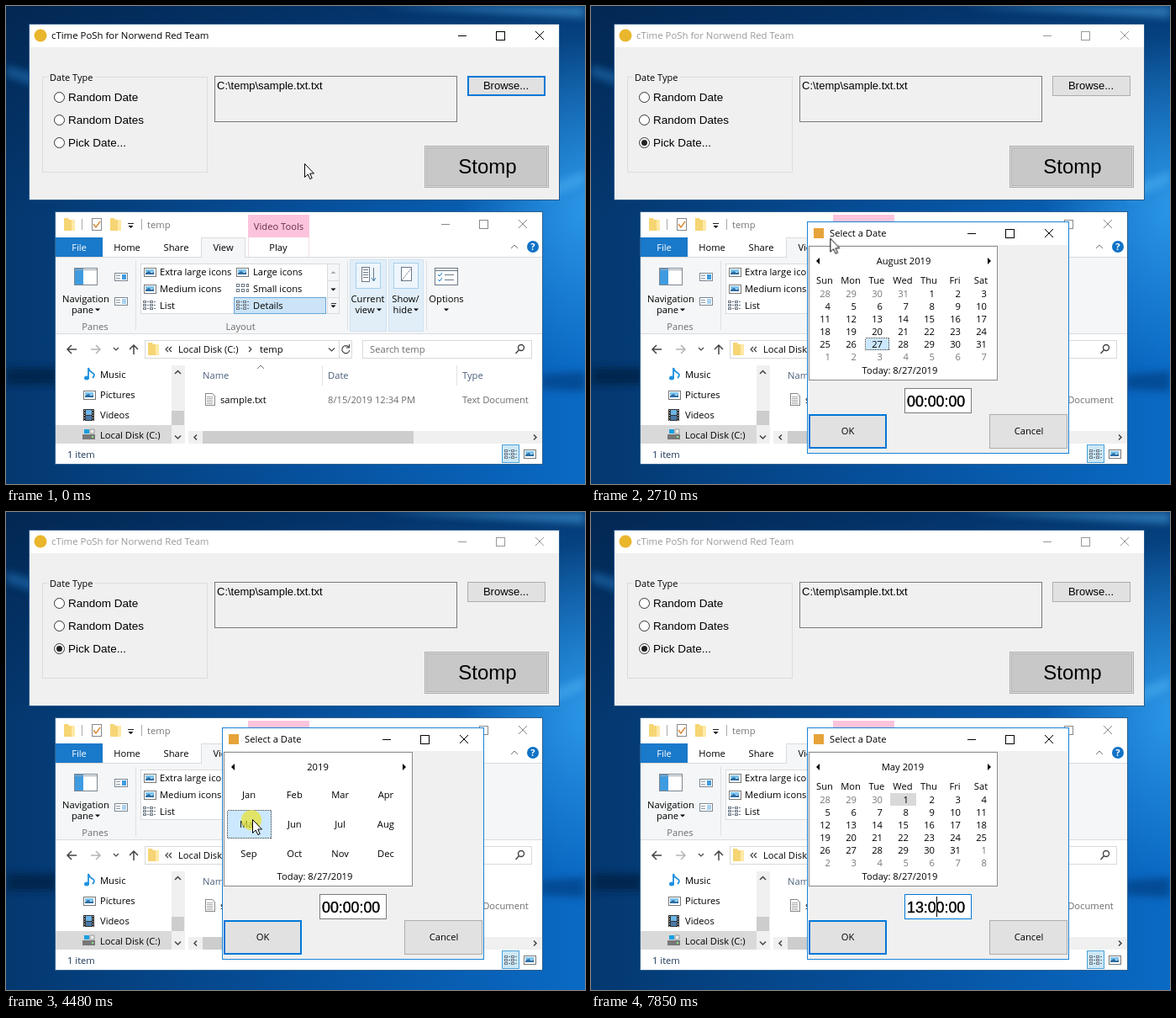
Animation, 689 px wide and 568 px high, one loop 8 s. Source, as an HTML page:

```html
<!DOCTYPE html>
<html lang="en">
<head>
<meta charset="utf-8">
<title>Date picker demo</title>
<style>
html,body{margin:0;width:100%;height:100%;overflow:hidden;background:#06407f}
svg{display:block;width:689px;height:568px}
text{font:11.2px "Open Sans","Noto Sans",sans-serif;fill:#000;white-space:pre}
.form text{font:13px "Liberation Sans",Arial,sans-serif}
.form .radio text{font-size:13.5px}
.form .ui,.form text.ui{font:11.4px "Open Sans","Noto Sans",sans-serif}
.form .ui{fill:currentColor}
.form .big{font-size:24px}
.time text{font:17.8px "Liberation Sans",Arial,sans-serif;stroke:#000;stroke-width:.4}
.m,.grid text,.m text{text-anchor:middle}
.grid .num{text-anchor:end}
.grid .out{fill:#777}
.gray{fill:#6d6d6d}
.head{fill:#4c607a}
rect,.crisp{shape-rendering:crispEdges}
.line{fill:none;stroke:currentColor}
.sel{fill:#cce8ff;stroke:#333;stroke-dasharray:1 1}
.hot{fill:#e5f3ff}
.blue,.grid .blue{fill:#0078d7}

/* state switches share one 8 s clock */
.k{animation:8s step-end infinite}
@keyframes active{0%{color:#000}19.5%,to{color:#999}}
@keyframes before{0%{opacity:1}19.5%,to{opacity:0}}
@keyframes radioHot{0%{stroke:#333}15.4%{stroke:#0078d7}19.5%,to{stroke:#333}}
@keyframes picked{0%{opacity:0}18.5%,to{opacity:1}}
@keyframes dialog{0%,19.4%{opacity:0;transform:scale(.92)}21.25%,to{opacity:1;transform:none}}
@keyframes august{0%{opacity:1}41.75%,to{opacity:0}}
@keyframes augTitle{0%{fill:#000}37.75%,to{fill:#0078d7}}
@keyframes months{0%{opacity:0}41.75%{opacity:1}57.25%,to{opacity:0}}
@keyframes yearTitle{0%{fill:#0078d7}45.625%,to{fill:#000}}
@keyframes marHot{0%{opacity:0}45.625%{opacity:1}46.5%,to{opacity:0}}
@keyframes febHot{0%{opacity:0}46.5%{opacity:1}51.2%,to{opacity:0}}
@keyframes mayHot{0%{opacity:0}53.1%,to{opacity:1}}
@keyframes augSel{0%{opacity:1}55.1%,to{opacity:0}}
@keyframes maySel{0%{opacity:0}55.1%,to{opacity:1}}
@keyframes may{0%{opacity:0}57.25%,to{opacity:1}}
@keyframes hot12{0%{opacity:1}60%,to{opacity:0}}
@keyframes hot1{0%{opacity:0}64.1%{opacity:1}67%,to{opacity:0}}
@keyframes sel31{0%{opacity:1}67%,to{opacity:0}}
@keyframes sel1{0%{opacity:0}67%{opacity:1}76.875%,to{opacity:0}}
@keyframes kept1{0%{opacity:0}76.875%,to{opacity:1}}
@keyframes text1{0%{fill:#000}64.1%{fill:#0078d7}69%,to{fill:#000}}
@keyframes box{0%{stroke:#7a7a7a}75%{stroke:#222}76.875%,to{stroke:#0078d7}}
@keyframes zero{0%{opacity:1}88.5%,to{opacity:0}}
@keyframes marked{0%{opacity:0}76.875%{opacity:1}88.5%,to{opacity:0}}
@keyframes typed1{0%{opacity:0}88.5%{opacity:1}91.375%,to{opacity:0}}
@keyframes typed2{0%{opacity:0}91.375%,to{opacity:1}}
@keyframes caret{
  0%{opacity:0;transform:translate(386px)}88.5%{opacity:1;transform:translate(386px)}
  91.375%{opacity:1;transform:translate(396px)}95.25%{opacity:1;transform:translate(401px)}
  98.125%,to{opacity:1;transform:translate(411px)}}
@keyframes click{
  0%{opacity:0}18.5%{opacity:.75;transform:translate(104px,158px)}19.5%{opacity:0}
  39.75%{opacity:.75;transform:translate(366px,302px)}40.75%{opacity:0}
  56%{opacity:.75;transform:translate(292px,366px)}57.25%{opacity:0}
  75%{opacity:.75;transform:translate(394px,463px)}78.75%,to{opacity:0}}
@keyframes arrow{0%{opacity:1}75%{opacity:0}78.75%{opacity:1}88.5%,to{opacity:0}}
@keyframes beam{0%{opacity:0}75%{opacity:1}78.75%,to{opacity:0}}
@keyframes path{
  0%{transform:translate(355px,187px)}
  7.5%{transform:translate(355px,187px);animation-timing-function:steps(3,start)}
  10.46%{transform:translate(310px,186px);animation-timing-function:steps(5,start)}
  15.4%{transform:translate(150px,164px);animation-timing-function:steps(3,start)}
  18.36%{transform:translate(104px,157px)}
  25%{transform:translate(104px,157px);animation-timing-function:steps(3,start)}
  27.925%{transform:translate(130px,175px);animation-timing-function:steps(5,start)}
  32.8%{transform:translate(265px,265px);animation-timing-function:steps(3,start)}
  35.74%{transform:translate(294px,281px);animation-timing-function:steps(4,start)}
  39.75%{transform:translate(367px,301px)}
  45.625%{transform:translate(367px,301px);animation-timing-function:steps(1,start)}
  46.5%{transform:translate(376px,324px);animation-timing-function:steps(2,start)}
  48.25%{transform:translate(352px,333px)}
  50.25%{transform:translate(352px,333px);animation-timing-function:steps(6,start)}
  56%{transform:translate(293px,365px)}
  60%{transform:translate(293px,365px);animation-timing-function:steps(5,start)}
  65.15%{transform:translate(371px,342px)}
  69%{transform:translate(371px,342px);animation-timing-function:steps(4,start)}
  73%{transform:translate(322px,440px);animation-timing-function:steps(3,start)}
  76%{transform:translate(394px,463px)}
  78.75%{transform:translate(394px,463px);animation-timing-function:steps(3,start)}
  81.86%{transform:translate(338px,461px);animation-timing-function:steps(1,start)}
  82.9%,to{transform:translate(347px,461px)}}
#dialog{transform-origin:413px 394px;animation:dialog 8s ease-out infinite}
</style>
</head>
<body>
<svg viewBox="0 0 689 568">
<defs>
  <linearGradient id="sky"><stop offset="0" stop-color="#04386f"/><stop offset=".5" stop-color="#06509c"/><stop offset="1" stop-color="#0a6ac4"/></linearGradient>
  <linearGradient id="top" x2="0" y2="1"><stop offset="0" stop-color="#021c40" stop-opacity=".6"/><stop offset=".45" stop-color="#021c40" stop-opacity="0"/></linearGradient>
  <radialGradient id="glow"><stop offset="0" stop-color="#36a5f2" stop-opacity=".75"/><stop offset="1" stop-color="#36a5f2" stop-opacity="0"/></radialGradient>
  <filter id="soft"><feGaussianBlur stdDeviation="4"/></filter>
  <g id="folder"><path d="M0 0h5l1 2h7v13H0z" fill="#f6d574"/><path d="M9 2h4v13H9z" fill="#ffe9a6"/></g>
  <g id="pic"><rect width="14" height="10" fill="#fff" stroke="#777"/><path d="M2 2h10v3H2z" fill="#7cc3f0"/><path d="M2 8V6l4-2 3 2 3-1v3z" fill="#2a6ea5"/></g>
  <g id="list" class="crisp"><path d="M.5 1.5h3v2h-3zm0 4h3v2h-3zm0 4h3v2h-3zM8.500 1.500h3v2h-3zm0 4h3v2h-3zm0 4h3v2h-3z" fill="#fff" stroke="#6b7885"/><path d="M5 2.500h2m-2 4h2m-2 4h2m6-8h2m-2 4h2m-2 4h2" stroke="#6b7885"/></g>
  <g id="buttons" class="line"><path class="crisp" d="M-51 .5h10M-5.500-4.500h10v10h-10z"/><path d="M41-5l10 10m0-10L41 5"/></g>
  <path id="down" d="M-3-1.500h6L0 1.500z"/>
</defs>

<rect width="689" height="568" fill="url(#sky)"/>
<rect width="689" height="568" fill="url(#top)"/>
<ellipse cx="690" cy="235" rx="150" ry="200" fill="url(#glow)"/>
<g filter="url(#soft)">
  <path d="M0 70L60 88V104L0 84z" fill="#2473bb" opacity=".55"/>
  <path d="M640 215L689 196V210L640 232zM440 0L689 0V14z" fill="#55b7f7" opacity=".45"/>
  <path d="M0 430H62V450H0z" fill="#021f45" opacity=".8"/>
  <path d="M636 438L689 434V458L636 455z" fill="#033a78" opacity=".6"/>
</g>

<!-- main form -->
<g class="form">
  <rect x="27" y="21" width="632" height="210" fill="#25588d"/>
  <rect x="28" y="22" width="630" height="208" fill="#f0f0f0"/>
  <rect x="28" y="22" width="630" height="27" fill="#fff"/>
  <circle cx="41" cy="35" r="7.500" fill="#e9b62c"/>
  <g class="k" style="animation-name:active"><text class="ui" x="54" y="39">cTime PoSh for Norwend Red Team</text><use href="#buttons" x="589" y="35"/></g>
  <path class="crisp" d="M49 84.500H43.500V197.500H239.500V84.500H106" fill="none" stroke="#dcdcdc"/>
  <text class="ui" x="52" y="89" style="font-size:11px">Date Type</text>
  <g class="radio">
    <g fill="#fff" stroke="#333"><circle cx="63.500" cy="108.500" r="6"/><circle cx="63.500" cy="135.500" r="6"/><circle class="k" style="animation-name:radioHot" cx="63.500" cy="162.500" r="6"/></g>
    <circle class="k" style="animation-name:picked" cx="63.500" cy="162.500" r="3.500" fill="#222"/>
    <text x="74" y="113">Random Date</text><text x="74" y="140">Random Dates</text><text x="74" y="167">Pick Date...</text>
  </g>
  <rect x="248.500" y="83.500" width="288" height="54" fill="#f0f0f0" stroke="#7a7a7a"/>
  <text x="251" y="99">C:\temp\sample.txt.txt</text>
  <rect x="549.500" y="83.500" width="92" height="23" fill="#e1e1e1" stroke="#adadad"/>
  <rect class="k" style="animation-name:before" x="550" y="84" width="91" height="22" fill="none" stroke="#0078d7" stroke-width="2"/>
  <text class="m" x="595" y="99">Browse...</text>
  <rect x="498.500" y="166.500" width="147" height="49" fill="#dedede" stroke="#adadad"/>
  <rect x="500.500" y="168.500" width="143" height="45" fill="#c8c8c8" stroke="#b4b4b4"/>
  <text class="m big" x="573" y="199">Stomp</text>
</g>

<!-- file explorer -->
<g id="explorer">
  <rect x="58" y="244" width="581" height="301" fill="#2f618f"/>
  <rect x="59" y="245" width="579" height="299" fill="#fff"/>
  <use href="#folder" x="69" y="252"/><use href="#folder" x="124" y="252"/>
  <path class="crisp" d="M90.500 253v13M161.500 253v13" stroke="#aaa"/>
  <rect x="102.500" y="252.500" width="11" height="14" fill="#fff" stroke="#888"/>
  <path d="M104 259l3 4 5-7" fill="none" stroke="#d98c3a" stroke-width="1.500"/>
  <path class="crisp" d="M145 258.500h7" stroke="#222"/><use href="#down" x="148.500" y="262.500"/>
  <text x="168" y="264" fill="#777" style="fill:#777">temp</text>
  <rect x="288" y="248" width="73" height="27" fill="#fcc4dc"/>
  <text class="m" x="324.500" y="266" style="fill:#6b2d4a">Video Tools</text>
  <use href="#buttons" x="569" y="259" color="#888"/>
  <path class="crisp" d="M288.500 275v24M360.500 275v24" stroke="#f3dbe6"/>
  <rect x="59" y="275" width="56" height="24" fill="#1979ca"/>
  <rect x="59" y="299" width="579" height="91" fill="#f5f6f7"/>
  <path class="crisp" d="M59 298.500H232.500V275.500H284.500V298.500H638M59 389.500H638" fill="none" stroke="#dadbdc"/>
  <rect x="233" y="276" width="51" height="24" fill="#f5f6f7"/>
  <g class="m"><text x="87" y="291" style="fill:#fff">File</text><text x="144" y="291">Home</text><text x="202.500" y="291">Share</text><text x="258.500" y="291">View</text><text x="324" y="291">Play</text></g>
  <path d="M601 288l4-4 4 4" fill="none" stroke="#777"/>
  <circle cx="627" cy="286" r="7" fill="#1072c6"/><text class="m" x="627" y="290" style="fill:#fff;font-weight:700">?</text>

  <path class="crisp" d="M154.500 303v82M406.500 303v82M500.500 303v82" stroke="#dfe0e1"/>
  <g class="crisp"><rect x="81.500" y="311.500" width="27" height="20" fill="#fff" stroke="#7b8792"/><path d="M82 312h10v19h-10z" fill="#3f9be0"/><path d="M82 313.500h26" stroke="#9aa5ae"/>
    <path d="M129.500 317.500h15v9h-15zM129.500 346.500h15v9h-15z" fill="#fff" stroke="#7b8792"/><path d="M138 319h5v6h-5z" fill="#3f9be0"/><path d="M138 348h5v6h-5z" fill="#a9d1f0"/><path d="M131 320.500h5m-5 3h5m-5 26h5m-5 3h5" stroke="#8b98a4"/></g>
  <g class="m"><text x="95" y="352">Navigation</text><text x="91" y="365">pane</text><text x="106" y="385" class="gray">Panes</text><text x="279" y="385" class="gray">Layout</text></g>
  <use href="#down" x="109" y="361"/>
  <rect x="160.500" y="306.500" width="236" height="59" fill="#fff" stroke="#dadbdc"/>
  <rect x="383" y="307" width="13" height="58" fill="#f5f6f7"/>
  <path class="crisp" d="M382.500 307v58M383 326.500h13M383 346.500h13" stroke="#dadbdc"/>
  <path d="M386.500 318h6l-3-3z" fill="#aaa"/><use href="#down" x="389.500" y="337"/><use href="#down" x="389.500" y="357"/><path class="crisp" d="M387 353.500h6" stroke="#333"/>
  <rect x="271.500" y="346.500" width="109" height="19" fill="#cce4f7" stroke="#66a7d9"/>
  <use href="#pic" x="164" y="311"/><use href="#pic" x="274" y="311"/><use href="#pic" x="164" y="331"/>
  <g fill="#fff" stroke="#6b7885" class="crisp"><path d="M274.500 330.500h3v3h-3zm6 0h3v3h-3zm6 0h2v3h-2zm-12 6h3v3h-3zm6 0h3v3h-3zm6 0h2v3h-2z"/></g>
  <use href="#list" x="163" y="349"/><use href="#list" x="274" y="349"/>
  <text x="183" y="320">Extra large icons</text><text x="183" y="340">Medium icons</text><text x="183" y="360">List</text>
  <text x="294" y="320">Large icons</text><text x="294" y="340">Small icons</text><text x="294" y="360">Details</text>
  <g fill="#e1eef8" stroke="#cfe3f3"><rect x="409.500" y="301.500" width="43" height="85"/><rect x="455.500" y="301.500" width="41" height="85"/></g>
  <g fill="#eef6fc" stroke="#a4cfee"><rect x="416.500" y="305.500" width="29" height="30"/><rect x="461.500" y="305.500" width="29" height="30"/></g>
  <g class="crisp" fill="#fff" stroke="#6b7885"><path d="M423.500 310.500h9v17h-9zM470.500 310.500h12v16h-12zM510.500 311.500h27v20h-27z"/><path d="M425 313.500h6m-6 3h6m-6 3h6m-6 3h6M437.500 311v15M511 314.500h26M522 319.500h11m-11 6h11"/></g>
  <path d="M435 323l2.500 4 2.500-4" fill="none" stroke="#3f7fb5"/><path d="M471 326l11-14" stroke="#6b7885" stroke-dasharray="2 1"/>
  <path d="M514 319l2 2 3-4m-5 8l2 2 3-4" fill="none" stroke="#1979ca"/>
  <g class="m"><text x="430.500" y="352">Current</text><text x="427" y="365">view</text><text x="475.500" y="352">Show/</text><text x="472" y="365">hide</text><text x="524" y="352">Options</text></g>
  <use href="#down" x="444" y="361"/><use href="#down" x="488" y="361"/><use href="#down" x="524" y="361"/>

  <g fill="none" stroke="#444" stroke-width="1.500"><path d="M84 408H73m5-5l-5 5 5 5M152 414V403m-5 5l5-5 5 5"/><path d="M101 408h11m-5-5l5 5-5 5" stroke="#b5b5b5"/><path d="M128 406l3 3 3-3M384 406.500l3.500 3.500 3.500-3.500M289 405l3 3-3 3M193 405l-3 3 3 3m4-6l-3 3 3 3" stroke-width="1.200"/><path d="M408 405.500a4.500 4.500 0 1 0 .8 3.500M408.500 402v4h-4" stroke-width="1.200"/></g>
  <g fill="none" stroke="#d9d9d9"><rect x="165.500" y="397.500" width="246" height="21"/><rect x="424.500" y="397.500" width="201" height="21"/><path class="crisp" d="M396.500 398v20"/></g>
  <use href="#folder" x="169" y="400"/>
  <text x="205" y="412">Local Disk (C:)</text><text x="302" y="412">temp</text><text x="433" y="412" class="gray">Search temp</text>
  <g fill="none" stroke="#444" stroke-width="1.400"><circle cx="613" cy="406" r="3.500"/><path d="M610.500 408.500l-4 4.500"/></g>

  <rect x="59" y="498" width="138" height="22" fill="#d9d9d9"/>
  <text x="112" y="442">Music</text><text x="112" y="466">Pictures</text><text x="112" y="490">Videos</text><text x="112" y="514">Local Disk (C:)</text>
  <path d="M98 430v12M98 430q1 4 5 6t0 6" fill="none" stroke="#1e90e0" stroke-width="1.800"/><ellipse cx="96" cy="442" rx="3" ry="2.500" fill="#1e90e0"/>
  <use href="#pic" x="92" y="457"/>
  <rect x="92" y="479" width="13" height="14" fill="#333"/><rect x="95" y="480" width="7" height="6" fill="#6db5e8"/><rect x="95" y="487" width="7" height="5" fill="#4a7aa8"/><path d="M93.500 480v13M103.500 480v13" stroke="#ddd" stroke-dasharray="1 2"/>
  <rect x="91" y="509" width="15" height="6" fill="#777"/><rect x="93" y="503" width="6" height="5" fill="#18a0e0"/><rect x="102" y="511" width="2" height="2" fill="#8f8"/><path d="M100 503h5v5h-5z" fill="#ededed" stroke="#999"/>
  <rect x="197" y="427" width="16" height="93" fill="#f0f0f0"/><rect x="197" y="481" width="15" height="17" fill="#cdcdcd"/>
  <rect x="217" y="505" width="421" height="15" fill="#f0f0f0"/><rect x="234" y="505" width="251" height="15" fill="#cdcdcd"/>
  <g fill="none" stroke="#444" stroke-width="1.500"><path d="M201 437l3.500-3.500 3.500 3.500M201 510.500l3.500 3.500 3.500-3.500M227 509.500l-3 3 3 3M628 509.500l3 3-3 3"/><path d="M299 431l4-4 4 4" stroke="#777" stroke-width="1"/></g>
  <path class="crisp" d="M376.500 427v24M536.500 427v24" stroke="#e2e2e2"/>
  <text x="234" y="443" class="head">Name</text><text x="383" y="443" class="head">Date</text><text x="543" y="443" class="head">Type</text>
  <path class="crisp" d="M237.500 460.500h8l3 3v11h-11z" fill="#fff" stroke="#888"/><path class="crisp" d="M239 464.500h7m-7 2h7m-7 2h7m-7 2h7m-7 2h7" stroke="#aaa"/>
  <text x="255" y="472">sample.txt</text><text x="383" y="472" class="gray">8/15/2019 12:34 PM</text><text x="543" y="472" class="gray">Text Document</text>
  <text x="73" y="537" style="fill:#1e395b">1 item</text>
  <rect x="590.500" y="521.500" width="20" height="21" fill="#cce8f7" stroke="#4aa0d5"/><use href="#list" x="593" y="526"/><use href="#pic" x="616" y="527"/>
</g>

<!-- date dialog -->
<g id="dialog">
  <rect x="257.500" y="256.500" width="311" height="275" fill="#f0f0f0" stroke="#1883d7"/>
  <rect x="258" y="257" width="310" height="27" fill="#fff"/>
  <rect x="265" y="264" width="12" height="12" fill="#e5a33a"/>
  <text x="284" y="274">Select a Date</text><use href="#buttons" x="499" y="270"/>
  <rect x="259.500" y="285.500" width="224" height="159" fill="#fff" stroke="#8a8a8a"/>
  <path d="M272 299v8l-4-4zM472 299v8l4-4z"/>
  <text class="m" x="367.500" y="437">Today: 8/27/2019</text>

  <g class="grid k" style="animation-name:august">
    <rect class="sel" x="326.500" y="394.500" width="28" height="14"/>
    <text class="k" style="animation-name:augTitle" x="372" y="307">August 2019</text>
    <g id="aug"></g>
  </g>
  <g class="grid k" style="animation-name:months">
    <text class="k" style="animation-name:yearTitle" x="371" y="307">2019</text>
    <rect class="hot k" style="animation-name:marHot" x="372" y="319" width="53" height="34"/>
    <rect class="hot k" style="animation-name:febHot" x="317" y="319" width="53" height="34"/>
    <rect class="hot k" style="animation-name:mayHot" x="263" y="354" width="53" height="34"/>
    <rect class="sel k" style="animation-name:augSel" x="426.500" y="354.500" width="52" height="33"/>
    <rect class="sel k" style="animation-name:maySel" x="263.500" y="354.500" width="52" height="33"/>
    <g id="names"></g>
  </g>
  <g class="grid k" style="animation-name:may">
    <rect class="hot k" style="animation-name:hot12" x="263" y="364" width="31" height="15"/>
    <rect class="hot k" style="animation-name:hot1" x="356" y="334" width="31" height="15"/>
    <rect class="sel k" style="animation-name:sel31" x="418.500" y="394.500" width="30" height="14"/>
    <rect class="sel k" style="animation-name:sel1" x="356.500" y="334.500" width="30" height="14"/>
    <rect class="k" style="animation-name:kept1" x="356" y="334" width="31" height="15" fill="#d9d9d9"/>
    <text x="371" y="307">May 2019</text>
    <g id="mayDays"></g>
  </g>

  <g class="time">
    <rect class="k" style="animation-name:box" x="373.500" y="454.500" width="79" height="29" fill="#fff"/>
    <text class="k" style="animation-name:zero" x="376" y="476">00:00:00</text>
    <g class="k" style="animation-name:marked"><rect x="376" y="457" width="21" height="24" fill="#0078d7"/><rect x="376" y="457" width="1" height="24" fill="#ff8728"/><text x="376" y="476" style="fill:#fff;stroke:#fff">00</text></g>
    <text class="k" style="animation-name:typed1" x="376" y="476">10:00:0_</text>
    <text class="k" style="animation-name:typed2" x="376" y="476">13:00:00</text>
    <rect class="k" style="animation-name:caret" y="457" width="1" height="24"/>
  </g>
  <rect x="260" y="486" width="91" height="39" fill="#e1e1e1" stroke="#0078d7" stroke-width="2"/>
  <rect x="474.500" y="485.500" width="92" height="40" fill="#e1e1e1" stroke="#adadad"/>
  <text class="m" x="305.500" y="509">OK</text><text class="m" x="521" y="509">Cancel</text>
</g>

<circle class="k" style="animation-name:click" r="12" fill="#e8e337"/>
<g style="animation:path 8s step-end infinite">
  <path class="k" style="animation-name:arrow" d="M.5.500V16.500L4.200 13 6.800 18.600 9.200 17.500 6.700 12H11.500z" fill="#fff" stroke="#000"/>
  <path class="k crisp" style="animation-name:beam" d="M-3-8.500H0M1-8.500H4M.5-8V8M-3 8.500H0M1 8.500H4" stroke="#000" fill="none"/>
</g>
</svg>
<script>
const find = id => document.getElementById(id);

function put(parent, str, x, y, cls = '') {
  const el = document.createElementNS('http://www.w3.org/2000/svg', 'text');
  el.setAttribute('x', x);
  el.setAttribute('y', y);
  el.setAttribute('class', cls);
  el.textContent = str;
  parent.append(el);
  return el;
}

// lead: days shown from the previous month, prev: its length
function fillDays(parent, lead, prev) {
  'Sun Mon Tue Wed Thu Fri Sat'.split(' ').forEach((d, i) => put(parent, d, 278 + 31 * i, 330));
  for (let i = 0; i < 42; i++) {
    const n = i - lead + 1;
    const out = n < 1 || n > 31;
    const day = n < 1 ? prev + n : n > 31 ? n - 31 : n;
    const el = put(parent, day, 285 + 31 * (i % 7), 346 + 15 * Math.floor(i / 7), out ? 'num out' : 'num');
    el.dataset.day = n;
  }
}

fillDays(find('aug'), 4, 31);
fillDays(find('mayDays'), 3, 30);
const first = find('mayDays').querySelector('[data-day="1"]');
first.classList.add('k');
first.style.animationName = 'text1';

'Jan Feb Mar Apr May Jun Jul Aug Sep Oct Nov Dec'.split(' ').forEach((m, i) =>
  put(find('names'), m, 289 + 54.3 * (i % 4), 340 + 35 * Math.floor(i / 4)));
</script>
</body>
</html>
```
